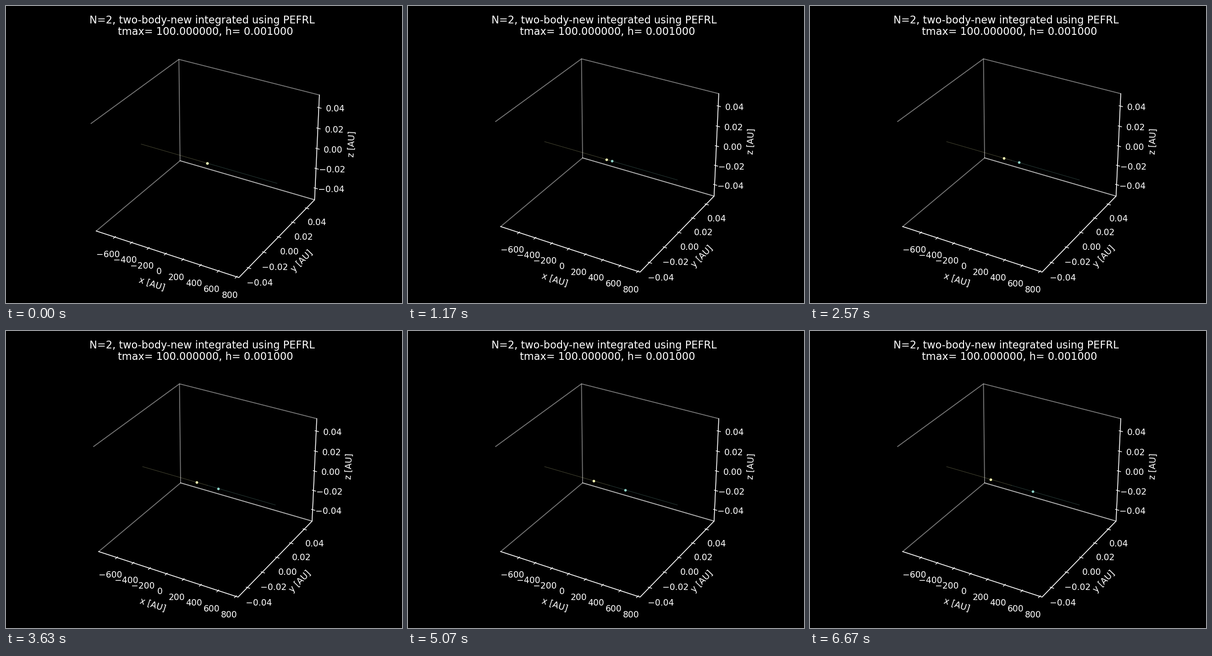
Write a matplotlib script that moves like this. It is 864x648 px and loops after 6710 ms.

```python
import numpy as np
import matplotlib.pyplot as plt
from matplotlib.animation import FuncAnimation

W, H, DPI = 864, 648, 135
FRAMES, LOOP_MS = 201, 6710
CYAN, YELLOW = "#8dd3c7", "#feffb3"

plt.rcParams["font.family"] = "DejaVu Sans"
plt.rcParams["font.size"] = 10

# Camera at elevation 30, azimuth -60, ten units from the box centre
EL, AZ, DIST = np.radians(30), np.radians(-60), 10
VIEW = np.array([np.cos(EL) * np.cos(AZ), np.cos(EL) * np.sin(AZ), np.sin(EL)])
RIGHT = np.array([-np.sin(AZ), np.cos(AZ), 0])
UP = np.cross(VIEW, RIGHT)

HALF = np.array([4, 4, 3]) / 7          # half sizes spanned by the data
WALL = HALF * 25 / 24                   # half sizes of the drawn box
LIMITS = np.array([793, 0.05, 0.05])    # data limits, symmetric about zero
TICK_OUT, TICK_IN = 0.019, -0.0095
LABEL_GAP = 281                         # pixels at unit depth

SPEED, START = 1.34, 10.5               # AU per frame, frame of separation


class Camera:
    def __init__(self, scale, cy):
        self.scale, self.cx, self.cy = scale, W / 2 + 0.0025 * scale, cy

    def __call__(self, pts):
        pts = np.asarray(pts, float)
        zoom = self.scale / (DIST - pts @ VIEW)
        return np.stack([self.cx + pts @ RIGHT * zoom,
                         self.cy - pts @ UP * zoom], axis=-1)


def corner(*signs):
    return WALL * signs


def on_x(value):
    return np.array([HALF[0] * value / LIMITS[0], 0, 0])


def number(v, digits):
    return f"{v:.{digits}f}".replace("-", "\u2212")


def make_axes(fig):
    ax = fig.add_axes([0, 0, 1, 1])
    ax.set_xlim(0, W)
    ax.set_ylim(H, 0)
    ax.axis("off")
    return ax


def line(ax, pts, color="white", lw=0.8, **kw):
    ax.plot(*np.transpose(pts), color=color, lw=lw, **kw)


def axis_ticks(ax, cam, dim, edge, values, digits, out, gap):
    """Ticks along one box edge, pointing outwards, with their numbers."""
    for v in values:
        p = corner(*edge)
        p[dim] = HALF[dim] * v / LIMITS[dim]
        out = np.asarray(out)
        line(ax, cam([p + TICK_IN * out, p + TICK_OUT * out]))
        x, y = cam(p + np.array(gap) * LABEL_GAP / cam.scale)
        ax.text(x, y + 6.8, number(v, digits), color="white",
                ha="center", va="baseline")


def build(fig, cam, names_at):
    ax = make_axes(fig)
    A, B, C, D = [corner(*s) for s in ((-1, 1, 1), (1, 1, 1), (1, 1, -1), (-1, 1, -1))]
    E, F, G = [corner(*s) for s in ((-1, -1, -1), (1, -1, -1), (-1, -1, 1))]

    for pane in ((E, D, A, G), (D, C, B, A), (E, F, C, D)):
        line(ax, cam(pane), "0.95", 1.0, alpha=0.5, solid_joinstyle="miter")
    line(ax, cam([E, F, C, B]), solid_capstyle="projecting")

    small = (-0.04, -0.02, 0, 0.02, 0.04)
    axis_ticks(ax, cam, 0, (0, -1, -1), range(-600, 801, 200), 0,
               (0, -1, 0), (0, -1, -1))
    axis_ticks(ax, cam, 1, (1, 0, -1), small, 2, (1, 0, 0), (1, 0, -1))
    axis_ticks(ax, cam, 2, (1, 1, 0), small, 2, (1, 0, 0), (1.175, 0.51, 0))

    for name, angle, (x, y) in zip("xyz", (-18, 45.7, 87.4), names_at):
        ax.text(x, y, f"{name} [AU]", color="white", rotation=angle,
                ha="center", va="center", rotation_mode="anchor")

    for side, color in ((1, CYAN), (-1, YELLOW)):
        line(ax, cam([on_x(0), on_x(side * LIMITS[0])]), color, 0.5, alpha=0.3)
    dots = [ax.plot(*cam(on_x([0][0])), "o", ms=2, color=c)[0]
            for c in (CYAN, YELLOW)]
    return ax, dots


fig = plt.figure(figsize=(W / DPI, H / DPI), dpi=DPI, facecolor="black")

# The layout is looser for one frame, then settles
opening, _ = build(fig, Camera(2994, 343.05),
                   [(318, 606), (645.5, 556.5), (754.5, 301.5)])
settled = Camera(2926, 336.75)
main, bodies = build(fig, settled, [(320.5, 597), (642, 546.5), (748, 295.5)])

heading = make_axes(fig)
for x, y, text in ((428.3, 38, "N=2, two-body-new integrated using PEFRL"),
                   (435.6, 63, "tmax= 100.000000, h= 0.001000")):
    heading.text(x, y, text, color="white", size=12, ha="center", va="baseline")


def update(k):
    opening.set_visible(k == 0)
    main.set_visible(k > 0)
    reach = SPEED * max(0, k - START)
    for dot, side in zip(bodies, (1, -1)):
        x, y = settled(on_x(side * reach))
        dot.set_data([x], [y])
    return bodies


anim = FuncAnimation(fig, update, frames=FRAMES, interval=LOOP_MS / FRAMES,
                     repeat=True, repeat_delay=0, blit=False)
plt.show()
```
